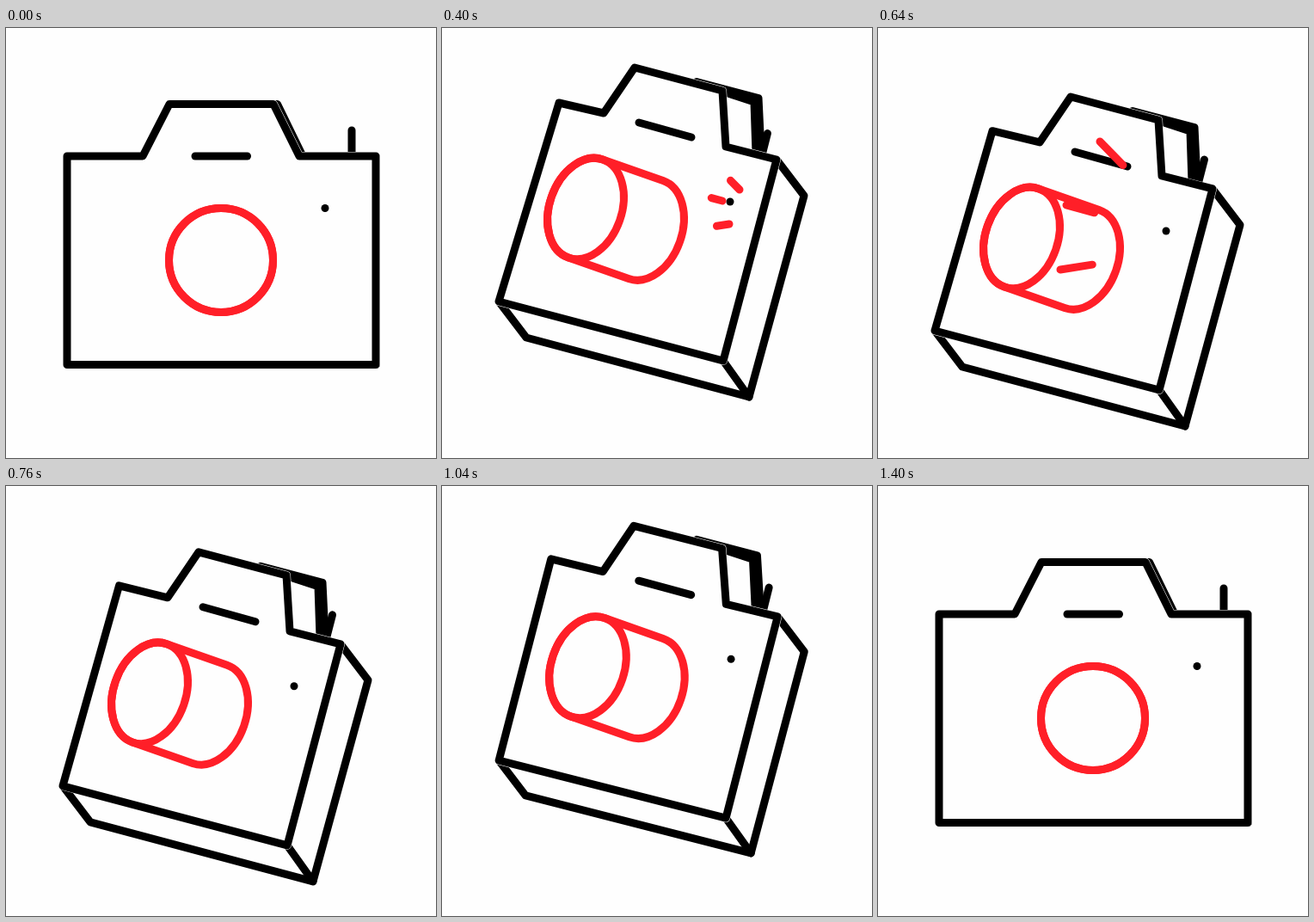
Animation, 500 px wide and 500 px high, one loop 2000 ms. Source, as an HTML page with a canvas:

```html
<!DOCTYPE html>
<html lang="en">
<head>
<meta charset="utf-8">
<title>Camera</title>
<style>
  html, body { margin: 0; width: 100%; height: 100%; overflow: hidden; background: #fefefe; }
  canvas { display: block; width: 100vw; height: 100vh; }
</style>
</head>
<body>
<canvas id="stage" width="500" height="500"></canvas>
<script>
const ctx = document.getElementById('stage').getContext('2d');
const INK = '#000', RED = '#ff1f28', PAPER = '#fefefe';
const LOOP = 2000, STEP = 40, LAST = 1400, WEIGHT = 9;

// Each point: x, y facing front, then x, y tilted.
const P = {
  tl: [71, 149, 136, 87],
  neckL: [159, 149, 188, 99],
  topL: [190, 88.5, 224, 46],
  topR: [311, 88.5, 326, 73],
  neckR: [341, 149, 330, 138],
  tr: [430, 149, 389, 153],
  br: [430, 391.5, 327, 387],
  bl: [71, 391.5, 66, 318],
  backTr: [430.5, 149.5, 421, 195],
  backBr: [430.5, 391.5, 357, 429],
  backBl: [71, 391.5, 98, 360],
  roofA: [298, 88.5, 296, 64],
  roofB: [311, 88.5, 363, 86],
  roofC: [341, 149, 365, 145],
  rimA: [298, 88.5, 296, 62.5],
  rimB: [315.5, 88.5, 368, 81.5],
  rimC: [345, 149, 371, 144],
  leverTop: [402, 119, 379.5, 119],
  leverEnd: [402, 150, 372.5, 146],
  barL: [220, 149, 229, 110],
  barR: [280.5, 149, 290, 127],
  dot: [371, 209.5, 335, 202],
  lens: [250, 270, 167, 210],
  mount: [250, 270, 237, 234.5]
};
const FRONT = ['tl', 'neckL', 'topL', 'topR', 'neckR', 'tr', 'br', 'bl'];
const RAYS = [[346, 188, 258, 98], [326, 201, 219, 172], [334, 228, 212, 247]];

const mix = (a, b, k) => a + (b - a) * k;
const span = (t, a, b) => Math.min(1, Math.max(0, (t - a) / (b - a)));

// cubic-bezier(.33, 0, .67, 1)
function smooth(x) {
  let lo = 0, hi = 1;
  for (let i = 0; i < 24; i++) {
    const u = (lo + hi) / 2, v = 1 - u;
    if (3 * v * v * u * 0.33 + 3 * v * u * u * 0.67 + u * u * u < x) lo = u;
    else hi = u;
  }
  return lo * lo * (3 - 2 * lo);
}
const ease = (t, a, b) => smooth(span(t, a, b));

function stroke(color, width = WEIGHT) {
  ctx.strokeStyle = color;
  ctx.lineWidth = width;
  ctx.stroke();
}

function line(points, closed) {
  ctx.beginPath();
  points.forEach(([x, y]) => ctx.lineTo(x, y));
  if (closed) ctx.closePath();
}

function fill(color) {
  ctx.fillStyle = color;
  ctx.fill();
}

function drawLens([fx, fy], [bx, by], k) {
  const a = mix(60.5, 42, k), b = 60.5, rot = 19.3 * k * Math.PI / 180;
  const dx = bx - fx, dy = by - fy, c = Math.cos(rot), s = Math.sin(rot);
  const u = Math.atan2((dy * c - dx * s) / b, (dx * c + dy * s) / a);
  const q = Math.PI / 2;
  ctx.beginPath();
  ctx.ellipse(bx, by, a, b, rot, u - q, u + q);
  ctx.ellipse(fx, fy, a, b, rot, u + q, u + 3 * q);
  ctx.closePath();
  fill(PAPER);
  stroke(RED);
  ctx.beginPath();
  ctx.ellipse(fx, fy, a, b, rot, 0, 2 * Math.PI);
  stroke(RED);
}

function drawRays(t) {
  const head = ease(t, 340, 620), tail = ease(t, 450, 750);
  if (head - tail < 0.001) return;
  for (const [x1, y1, x2, y2] of RAYS) {
    line([tail, head].map(k => [mix(x1, x2, k), mix(y1, y2, k)]));
    stroke(RED);
  }
}

function draw(t) {
  const k = ease(t, 0, 367) - ease(t, 1000, 1390);
  const dip = (36 * ease(t, 400, 680) - 37 * ease(t, 680, 1020)) * k;
  const press = 3.5 * Math.sin(Math.PI * span(t, 340, 460));
  const drift = span(t, 400, 1000) * k;

  const at = name => {
    const [x1, y1, x2, y2] = P[name];
    return [mix(x1, x2, k), mix(y1, y2, k)];
  };
  const path = (names, closed) => line(names.map(at), closed);

  ctx.setTransform(1, 0, 0, 1, 0, 0);
  ctx.fillStyle = PAPER;
  ctx.fillRect(0, 0, 500, 500);
  ctx.translate(0, dip);
  ctx.lineCap = ctx.lineJoin = 'round';

  const [lx, ly] = at('leverTop');
  line([[lx - 0.3 * press, ly + press], at('leverEnd')]);
  stroke(INK);
  for (const names of [['roofA', 'roofB', 'roofC'], ['rimA', 'rimB', 'rimC']]) {
    path(names);
    stroke(INK);
  }

  path(['tr', 'backTr', 'backBr', 'backBl', 'bl', 'br'], true);
  fill(PAPER);
  path(['tr', 'backTr', 'backBr', 'backBl', 'bl']);
  stroke(INK);
  path(['br', 'backBr']);
  stroke(INK);

  const front = FRONT.map(at);
  front[0][0] -= 7.5 * drift;
  front[0][1] -= 3.2 * drift;
  line(front, true);
  fill(PAPER);
  stroke(PAPER, WEIGHT + 1);
  stroke(INK);

  path(['barL', 'barR']);
  stroke(INK);
  ctx.beginPath();
  ctx.arc(...at('dot'), 4.5, 0, 2 * Math.PI);
  fill(INK);

  drawLens(at('lens'), at('mount'), k);
  drawRays(t);
}

const start = performance.now();
function tick() {
  const t = (performance.now() - start) % LOOP;
  draw(Math.min(LAST, Math.floor(t / STEP + 0.01) * STEP));
  requestAnimationFrame(tick);
}
tick();
</script>
</body>
</html>
```
